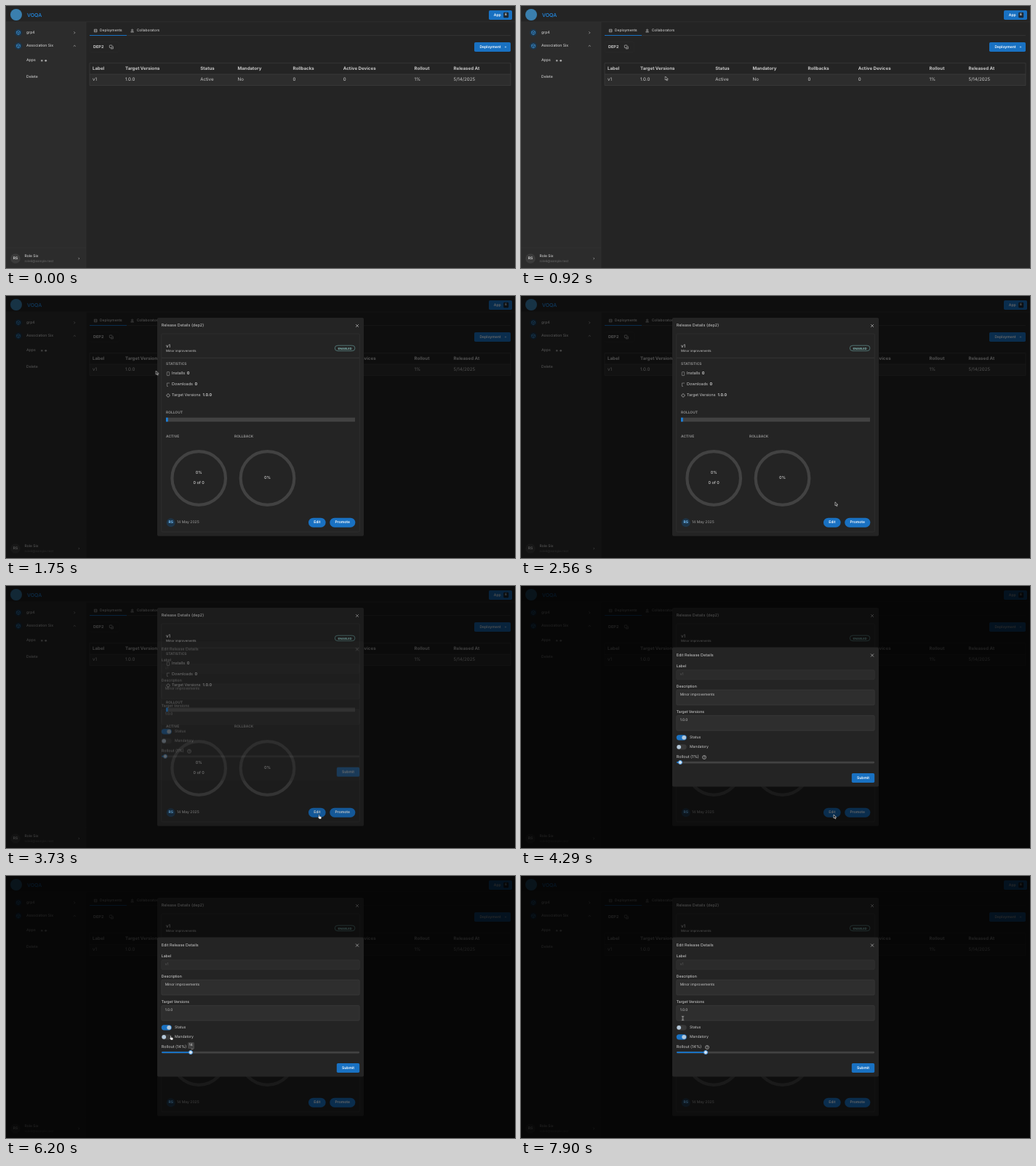
Animation, 700 px wide and 361 px high, one loop 8000 ms. Source, as an HTML page:

```html
<!DOCTYPE html>
<html lang="en">
<head>
<meta charset="utf-8">
<title>Release rollout</title>
<style>
@property --v { syntax: "<integer>"; inherits: true; initial-value: 1; }

html, body { margin: 0; width: 100%; height: 100%; overflow: hidden; background: #242424; }
body, svg text { font-family: Inter, Roboto, sans-serif; text-rendering: geometricPrecision; }
#stage { position: relative; width: 700px; height: 361px; overflow: hidden; }
.layer { position: absolute; inset: 0; width: 700px; height: 361px; }
text { dominant-baseline: central; fill: #c9c9c9; font-size: 5.5px; }
.b { font-weight: 700; }
.m { font-weight: 500; }
.c { text-anchor: middle; }
.th text { font-size: 6.16px; font-weight: 700; }
.td text { font-size: 6.16px; }
.nav text { font-size: 5.1px; font-weight: 500; }
.cap text { font-size: 4.9px; font-weight: 700; fill: #8c8c8c; }
.btn text { font-size: 5px; font-weight: 600; fill: #fff; text-anchor: middle; }
.btn rect { fill: #1971c2; }
.ico { fill: none; stroke: #b8b8b8; stroke-width: .7; }
.field { fill: #2e2e2e; stroke: #424242; stroke-width: .5; }
.box { fill: #242424; }
.shade { fill: #000; fill-opacity: .6; }

/* one loop of 8 s */
.anim, #cursor, #cursor g { animation: 8s linear infinite; }
#dim { animation-name: dim; animation-timing-function: step-end; }
#wait { animation-name: wait; animation-timing-function: step-end; }
#detail { animation-name: detail; animation-timing-function: step-end; }
#shade2 { animation-name: fade; }
#edit { animation-name: drop, drag; animation-duration: 8s; animation-timing-function: linear; animation-iteration-count: infinite; counter-reset: v var(--v); }
#tip { animation-name: tip; }
#cursor { animation-name: move; }
#cursor #arrow { animation-name: arrow; animation-timing-function: step-end; }
#cursor #hand { animation-name: hand; animation-timing-function: step-end; }
#cursor #beam { animation-name: beam; animation-timing-function: step-end; }
.on1 { animation-name: off; }
.on2 { animation-name: on; }
.knob1 { animation-name: left; }
.knob2 { animation-name: right; }

@keyframes dim { 0% { opacity: 0 } 13.6%, 100% { opacity: 1 } }
@keyframes wait { 0% { opacity: 0 } 13.6% { opacity: 1 } 14.1%, 100% { opacity: 0 } }
@keyframes detail { 0% { opacity: 0 } 14.1%, 100% { opacity: 1 } }
@keyframes fade { 0%, 46.06% { opacity: 0; animation-timing-function: ease } 48.56%, 100% { opacity: 1 } }
@keyframes drop {
  0%, 46.06% { opacity: 0; transform: translateY(-13.2px); animation-timing-function: ease }
  48.56%, 100% { opacity: 1; transform: none }
}
@keyframes drag { 0%, 65% { --v: 1 } 73.75%, 100% { --v: 14 } }
@keyframes tip { 0%, 62.4% { opacity: 0 } 63.7%, 77.9% { opacity: 1 } 79.2%, 100% { opacity: 0 } }
@keyframes off { 0%, 87.8% { opacity: 1 } 89.7%, 100% { opacity: 0 } }
@keyframes on { 0%, 81.2% { opacity: 0 } 82.9%, 100% { opacity: 1 } }
@keyframes left { 0%, 87.8% { transform: translateX(7px) } 89.7%, 100% { transform: none } }
@keyframes right { 0%, 81.2% { transform: none } 82.9%, 100% { transform: translateX(7px) } }
@keyframes move {
  0%, 5.49% { opacity: 0; transform: translate(262px, 172px) }
  5.5% { opacity: 1; transform: translate(262px, 172px); animation-timing-function: ease-out }
  8.4% { transform: translate(203px, 103px) }
  10.1% { transform: translate(203px, 103px) }
  11.5%, 20.6% { transform: translate(198.5px, 97px); animation-timing-function: ease-in-out }
  30.6%, 32% { transform: translate(432px, 283.8px); animation-timing-function: ease-in-out }
  41%, 55.2% { transform: translate(430px, 315px); animation-timing-function: ease-in-out }
  62.4%, 65% { transform: translate(218.5px, 241px) }
  73.75%, 75% { transform: translate(253px, 241px); animation-timing-function: ease-in-out }
  77.4%, 84.7% { transform: translate(226px, 220px); animation-timing-function: ease-in-out }
  86%, 91.2% { transform: translate(225px, 207px); animation-timing-function: ease-in-out }
  97.5%, 100% { opacity: 1; transform: translate(222.5px, 196px) }
}
@keyframes arrow { 0% { opacity: 1 } 39% { opacity: 0 } 48.5% { opacity: 1 } 62% { opacity: 0 } 100% { opacity: 0 } }
@keyframes hand { 0% { opacity: 0 } 39% { opacity: 1 } 48.5% { opacity: 0 } 62% { opacity: 1 } 94.5%, 100% { opacity: 0 } }
@keyframes beam { 0% { opacity: 0 } 94.5%, 100% { opacity: 1 } }

#roll { position: absolute; left: 213.8px; top: 231.8px; height: 8px; line-height: 8px; font-size: 5.5px; color: #c9c9c9; white-space: nowrap; display: flex; align-items: center; }
#roll svg { margin-left: 4.5px; overflow: visible; }
.num::before { content: counter(v); }
#bar, #thumb, #tip { position: absolute; }
#bar { left: 214px; top: 241.8px; height: 2.6px; width: calc(3px + 2.66px * var(--v)); border-radius: 2px; background: #1971c2; }
#thumb { left: calc(213.5px + 2.66px * var(--v)); top: 239.6px; width: 4.2px; height: 4.2px; border: 1.4px solid #4a97dc; border-radius: 50%; background: #dbe7f2; }
#tip { left: calc(217px + 2.66px * var(--v)); top: 229px; height: 9px; line-height: 9px; padding: 0 2px; margin-left: -4.5px; min-width: 5px; text-align: center; border-radius: 1.5px; background: #424242; color: #ddd; font-size: 4.6px; }
</style>
</head>
<body>
<div id="stage">

<svg class="layer" viewBox="0 0 700 361">
  <rect width="700" height="361" fill="#242424"/>
  <rect y="22" width="110" height="339" fill="#2c2c2c"/>
  <path d="M0 21.8H700M110 22V361M0 333H110" fill="none" stroke="#343434" stroke-width=".6"/>
  <circle cx="14" cy="12" r="8" fill="#3a7fae"/>
  <text class="m" x="29" y="12" style="font-size:7px;fill:#228be6">VOQA</text>

  <g class="nav">
    <g id="org">
      <circle cx="17" cy="36.7" r="5" fill="#1d3549"/>
      <path d="M17 33.9l2.4 1.4v2.8L17 39.5l-2.4-1.4v-2.8zM14.6 35.3l2.4 1.4 2.4-1.4M17 36.7v2.8" fill="none" stroke="#3d97dd" stroke-width=".7"/>
    </g>
    <use href="#org" y="18.4"/>
    <text x="28" y="37">grp4</text>
    <text x="28" y="55">Association Six</text>
    <text x="28" y="75">Apps</text>
    <text x="28" y="98">Delete</text>
    <path class="ico" d="M93.4 35.3l1.5 1.5-1.5 1.5M92.8 55.7l1.5-1.4 1.5 1.4"/>
    <rect x="48" y="74.2" width="2.6" height="2.2" fill="#999"/>
    <circle cx="54.7" cy="75.3" r="1.4" fill="#aaa"/>
  </g>

  <circle cx="13" cy="348" r="6.8" fill="#3b3b3b"/>
  <text class="b c" x="13" y="348.2" style="font-size:5px">RS</text>
  <text class="m" x="25.5" y="345.2" style="font-size:5px">Role Six</text>
  <text x="25.5" y="352" style="font-size:4.5px;fill:#696969">role6@sample.test</text>
  <path class="ico" d="M99.6 346.8l1.2 1.2-1.2 1.2"/>

  <g class="btn">
    <rect x="664" y="6" width="32" height="13" rx="1.8"/>
    <text x="675.8" y="12.6">App</text>
    <rect x="684.2" y="8.7" width="7" height="7.6" rx="1.2" style="fill:#1e2933"/>
    <text x="687.7" y="12.6" style="font-size:4.4px">E</text>
    <rect x="644" y="50" width="50" height="13" rx="1.8"/>
    <text x="666" y="56.7">Deployment</text>
    <path d="M685.8 56.5h2.4M687 55.3v2.4" stroke="#b9d8f5" stroke-width=".6"/>
  </g>

  <path d="M115 40.6H694" stroke="#3a3a3a" stroke-width=".7"/>
  <path d="M115 40.5H166" stroke="#1971c2" stroke-width="1.1"/>
  <g class="ico">
    <path d="M121.4 32.2h3.6v3.6h-3.6zM121.4 34h3.6"/>
    <circle cx="173.6" cy="33.2" r="1.1"/>
    <path d="M171.7 36c.4-1.7 3.4-1.7 3.8 0z"/>
    <rect x="142.3" y="54" width="3.6" height="3.6" rx=".6"/>
    <path d="M144 58.9h3.3v-3.4"/>
  </g>
  <text class="m" x="129" y="34.2" style="font-size:4.9px">Deployments</text>
  <text class="m" x="179.7" y="34.2" style="font-size:4.9px">Collaborators</text>
  <rect x="115.3" y="49.5" width="40" height="14" rx="1.5" fill="none" stroke="#2c2c2c" stroke-width=".5"/>
  <text class="b" x="120" y="56.7" style="font-size:5.5px">DEP2</text>

  <rect x="115" y="94" width="579" height="15.5" fill="#2d2d2d"/>
  <path d="M115 78.7H694V109.5H115ZM115 94H694" fill="none" stroke="#404040" stroke-width=".6"/>
  <g class="th">
    <text x="119" y="86.2">Label</text><text x="164" y="86.2">Target Versions</text>
    <text x="267.3" y="86.2">Status</text><text x="318.5" y="86.2">Mandatory</text>
    <text x="394.5" y="86.2">Rollbacks</text><text x="463.8" y="86.2">Active Devices</text>
    <text x="561.5" y="86.2">Rollout</text><text x="615.5" y="86.2">Released At</text>
  </g>
  <g class="td">
    <text x="119" y="101.7">v1</text><text x="164" y="101.7">1.0.0</text>
    <text x="267.3" y="101.7">Active</text><text x="318.5" y="101.7">No</text>
    <text x="394.5" y="101.7">0</text><text x="463.8" y="101.7">0</text>
    <text x="561.5" y="101.7">1%</text><text x="615.5" y="101.7">5/14/2025</text>
  </g>
</svg>

<svg class="layer" viewBox="0 0 700 361">
  <rect id="dim" class="anim shade" width="700" height="361"/>

  <g id="wait" class="anim">
    <rect class="box" x="208" y="94" width="284" height="173" rx="1.8"/>
    <text x="213.7" y="105">Release Details (dep2)</text>
    <path class="ico" d="M481 103l4 4m0-4l-4 4"/>
    <rect x="213.7" y="116" width="272.6" height="145.5" rx="1.5" fill="#303030" stroke="#3a3a3a" stroke-width=".5"/>
  </g>

  <g id="detail" class="anim">
    <rect class="box" x="208" y="30" width="284" height="300.7" rx="1.8"/>
    <text x="213.7" y="41.2">Release Details (dep2)</text>
    <path class="ico" d="M481 39l4 4m0-4l-4 4"/>
    <rect x="213.8" y="52" width="272.4" height="273" rx="1.5" fill="none" stroke="#353535" stroke-width=".6"/>
    <path d="M214 85.3H486" stroke="#3c3c3c" stroke-width=".7"/>
    <text class="m" x="220" y="69" style="font-size:6.1px">v1</text>
    <text x="220" y="76.4" style="font-size:4.3px">Minor improvements</text>
    <rect x="452.3" y="68.2" width="27.6" height="7.4" rx="3.7" fill="none" stroke="#6ca7a4" stroke-width=".6"/>
    <text class="b c" x="466.1" y="72" style="font-size:4.1px;fill:#84b9b5">ENABLED</text>
    <g class="cap">
      <text x="220" y="94.3">STATISTICS</text>
      <text x="220" y="161.3">ROLLOUT</text>
      <text x="220" y="193.6">ACTIVE</text>
      <text x="314" y="193.6">ROLLBACK</text>
    </g>
    <g class="ico" style="stroke:#999;stroke-width:.6">
      <rect x="221.3" y="104.6" width="3.4" height="5" rx=".6"/>
      <path d="M225 120h-3.6v4.4H223"/>
      <circle cx="223" cy="137" r="2"/><path d="M223 134v1.6M223 138.4v1.6M220 137h1.6M224.4 137h1.6"/>
    </g>
    <text x="228" y="107.2">Installs <tspan class="b" dx="1">0</tspan></text>
    <text x="228" y="122.2">Downloads <tspan class="b" dx="1">0</tspan></text>
    <text x="228" y="137" style="font-size:5.35px">Target Versions <tspan class="b" dx="1.5">1.0.0</tspan></text>
    <rect x="220" y="167.6" width="260" height="5.6" fill="#424242"/>
    <rect x="220" y="167.6" width="2.8" height="5.6" fill="#1c7ed6"/>
    <g fill="none" stroke="#424242" stroke-width="4.2">
      <circle cx="265.2" cy="251" r="36.8"/><circle cx="359.5" cy="251" r="36.8"/>
    </g>
    <g class="c m">
      <text x="265.2" y="243.7">0%</text><text x="265.2" y="258.3">0 of 0</text><text x="359.5" y="251.2">0%</text>
    </g>
    <circle cx="226.7" cy="312.2" r="6" fill="#1d3549"/>
    <text class="b c" x="226.7" y="312.4" style="font-size:5px;fill:#74c0fc">RS</text>
    <text x="235" y="312.3" style="font-size:5.05px;fill:#a0a0a0">14 May 2025</text>
    <g class="btn">
      <rect x="416" y="305.7" width="23.6" height="13" rx="6.5"/><text x="427.8" y="312.3">Edit</text>
      <rect x="445.3" y="305.7" width="35" height="13" rx="6.5"/><text x="462.8" y="312.3">Promote</text>
    </g>
  </g>
  <rect id="shade2" class="anim shade" width="700" height="361"/>
</svg>

<div id="edit" class="layer">
  <svg class="layer" viewBox="0 0 700 361">
    <rect class="box" x="208" y="84.6" width="284" height="192" rx="1.8"/>
    <text x="213.7" y="95.7">Edit Release Details</text>
    <path class="ico" d="M481 93.5l4 4m0-4l-4 4"/>
    <g class="nav">
      <text x="213.8" y="111.3">Label</text>
      <text x="213.8" y="139.2">Description</text>
      <text x="213.8" y="174.3">Target Versions</text>
    </g>
    <rect class="field" x="213.8" y="115.8" width="272.4" height="13" rx="1.6" opacity=".7"/>
    <rect class="field" x="213.8" y="143.2" width="272.4" height="20.8" rx="1.6"/>
    <rect class="field" x="213.8" y="178.4" width="272.4" height="20.8" rx="1.6"/>
    <text x="218.7" y="122.4" style="fill:#5c5c5c;font-size:5px">v1</text>
    <text x="218.7" y="149.6" style="font-size:4.9px">Minor improvements</text>
    <text x="218.7" y="185" style="font-size:4.9px">1.0.0</text>
    <g fill="#383838">
      <rect x="213.8" y="205.2" width="14" height="7.2" rx="3.6"/>
      <rect x="213.8" y="218.2" width="14" height="7.2" rx="3.6"/>
    </g>
    <g fill="#1971c2">
      <rect class="anim on1" x="213.8" y="205.2" width="14" height="7.2" rx="3.6"/>
      <rect class="anim on2" x="213.8" y="218.2" width="14" height="7.2" rx="3.6"/>
    </g>
    <g fill="#b4c8da">
      <circle class="anim knob1" cx="217.2" cy="208.8" r="2.9"/>
      <circle class="anim knob2" cx="217.2" cy="221.8" r="2.9"/>
    </g>
    <text x="232" y="209" style="font-size:5.1px">Status</text>
    <text x="232" y="222" style="font-size:5.1px">Mandatory</text>
    <rect x="214" y="241.8" width="272.2" height="2.6" rx="1.3" fill="#424242"/>
    <g class="btn">
      <rect x="454.8" y="258" width="31.4" height="13" rx="1.8"/><text x="470.5" y="264.6">Submit</text>
    </g>
  </svg>
  <div id="roll">Rollout (<span class="num"></span>%)<svg width="6" height="6" viewBox="0 0 6 6"><circle class="ico" cx="3" cy="3" r="2.5"/><path class="ico" d="M2.2 2.3c.2-1 1.7-.8 1.6.1 0 .5-.8.6-.8 1.2M3 4.2v.5"/></svg></div>
  <div id="bar"></div>
  <div id="thumb"></div>
  <div id="tip" class="anim num"></div>
</div>

<svg class="layer" viewBox="0 0 700 361">
  <g id="cursor">
    <g id="arrow"><path d="M0 0V5L1.2 4l.9 1.9.9-.4L2.2 3.7H3.7Z" fill="#111" stroke="#eee" stroke-width=".6"/></g>
    <g id="hand"><path d="M0 .3c.4-.6 1-.3 1 .2v1.8l2.2.5c.6.2.7.6.6 1.2L3.4 6H.8L-1 3.6c-.2-.6.4-.8 1-.2z" fill="#fff" stroke="#222" stroke-width=".4"/></g>
    <g id="beam"><path d="M-1.4-2.8Q0-2.8 0-2 0-2.8 1.4-2.8M0-2V2M-1.4 2.8Q0 2.8 0 2 0 2.8 1.4 2.8" fill="none" stroke="#e4e4e4" stroke-width=".7"/></g>
  </g>
</svg>

</div>
</body>
</html>
```
